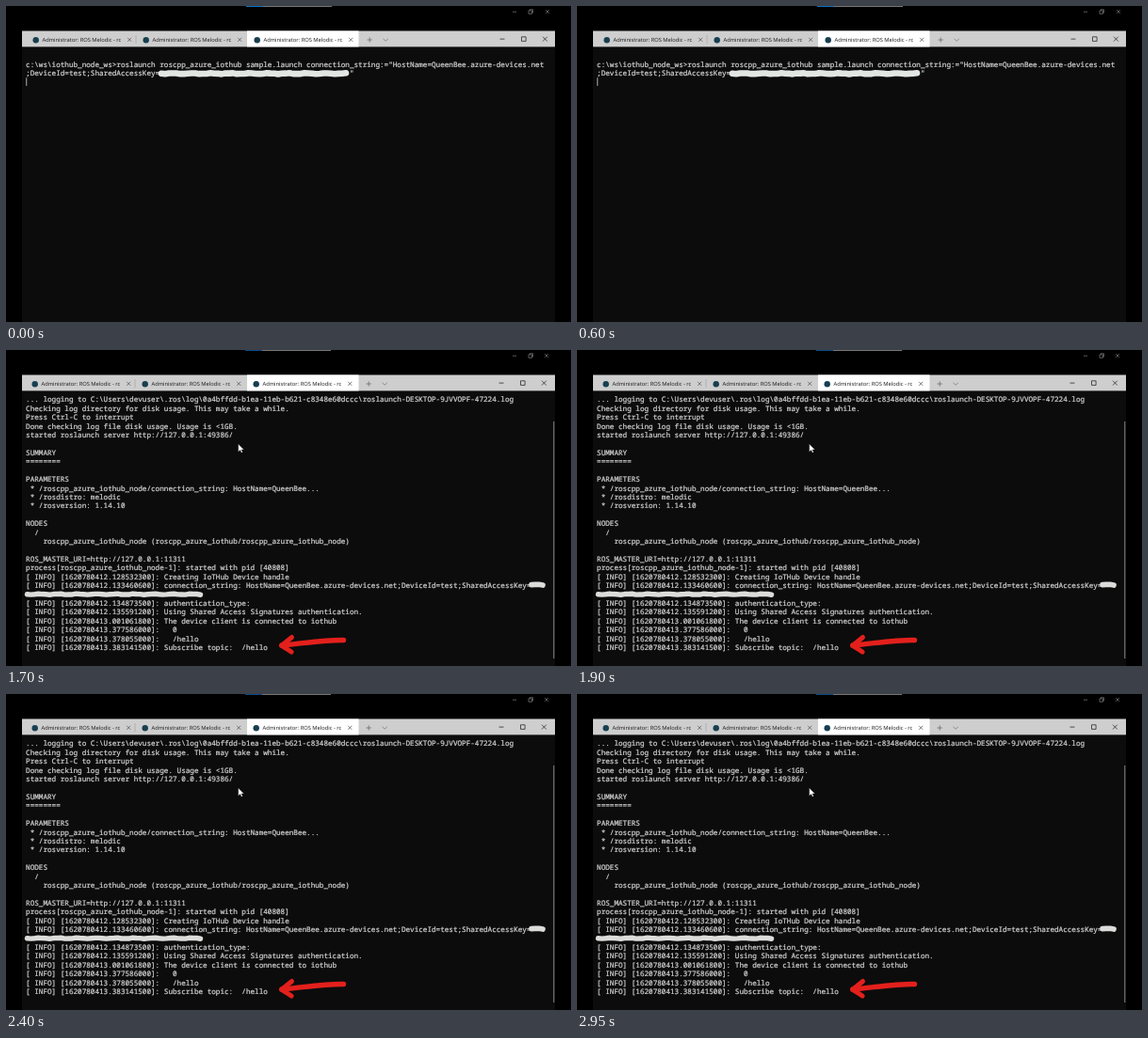
Animation of 600 by 336 pixels, one loop 3 s. Source, as an HTML page:

```html
<!DOCTYPE html>
<html lang="en">
<head>
<meta charset="utf-8">
<title>Terminal</title>
<style>
  html, body { margin: 0; width: 100%; height: 100%; overflow: hidden; background: #000; }
  svg { display: block; width: 100%; height: 100%; }
  text { white-space: pre; text-rendering: geometricPrecision; }
  .mono {
    font: 7.655px "Noto Sans Mono", "DejaVu Sans Mono", monospace;
    fill: #d0d0d0; stroke: #d0d0d0; stroke-width: .24;
  }
  .tab { font: 5.78px "Open Sans", "Noto Sans", sans-serif; fill: #161616; }
  .line { fill: none; stroke-width: .75; }
  .ink { fill: none; stroke-linecap: round; stroke-linejoin: round; }
</style>
</head>
<body>
<svg id="stage" viewBox="0 0 600 336" xmlns="http://www.w3.org/2000/svg">
  <rect width="600" height="336" fill="#000"/>
  <rect x="17" y="26.5" width="566" height="310" fill="#0c0c0c"/>
  <g id="command"></g>
  <g id="output"></g>
</svg>
<script>
const LOOP = 3000, CUT = 1700;
const LEFT = 21.1, TOP = 55.3, PITCH = 9.42;

const command = [
  '',
  'c:\\ws\\iothub_node_ws>roslaunch roscpp_azure_iothub sample.launch connection_string:="HostName=QueenBee.azure-devices.net',
  ';DeviceId=test;SharedAccessKey=' + ' '.repeat(44) + '"'
];

const info = (stamp, msg) => `[ INFO] [1620780${stamp}]: ${msg}`;
const output = [
  '... logging to C:\\Users\\devuser\\.ros\\log\\0a4bffdd-b1ea-11eb-b621-c8348e60dccc\\roslaunch-DESKTOP-9JVVOPF-47224.log',
  'Checking log directory for disk usage. This may take a while.',
  'Press Ctrl-C to interrupt',
  'Done checking log file disk usage. Usage is <1GB.',
  'started roslaunch server http://127.0.0.1:49386/',
  '',
  'SUMMARY',
  '========',
  '',
  'PARAMETERS',
  ' * /roscpp_azure_iothub_node/connection_string: HostName=QueenBee...',
  ' * /rosdistro: melodic',
  ' * /rosversion: 1.14.10',
  '',
  'NODES',
  '  /',
  '    roscpp_azure_iothub_node (roscpp_azure_iothub/roscpp_azure_iothub_node)',
  '',
  'ROS_MASTER_URI=http://127.0.0.1:11311',
  'process[roscpp_azure_iothub_node-1]: started with pid [40808]',
  info('412.128532300', 'Creating IoTHub Device handle'),
  info('412.133460600', 'connection_string: HostName=QueenBee.azure-devices.net;DeviceId=test;SharedAccessKey='),
  '',
  info('412.134873500', 'authentication_type:'),
  info('412.135591200', 'Using Shared Access Signatures authentication.'),
  info('413.001061800', 'The device client is connected to iothub'),
  info('413.377586000', '  0'),
  info('413.378055000', '  /hello'),
  info('413.383141500', 'Subscribe topic:  /hello')
];

const escapeText = s => s.replace(/&/g, '&amp;').replace(/</g, '&lt;');
const rect = (x, y, w, h, fill) => `<rect x="${x}" y="${y}" width="${w}" height="${h}" fill="${fill}"/>`;
const line = (d, color) => `<path class="line" d="${d}" stroke="${color}"/>`;
const ink = (d, width, color) => `<path class="ink" d="${d}" stroke="${color}" stroke-width="${width}"/>`;
const cross = (x, y, r, color) =>
  line(`M${x - r} ${y - r}l${2 * r} ${2 * r}M${x + r} ${y - r}l${-2 * r} ${2 * r}`, color);

const lines = rows => rows.map((s, i) => s &&
  `<text class="mono" x="${LEFT}" y="${TOP + i * PITCH}">${escapeText(s)}</text>`).join('');

// Slightly wavy marker stroke that hides the key
function scribble(x0, x1, y, width, color) {
  let d = `M${x0} ${y}`;
  for (let x = x0 + 4; x <= x1; x += 4)
    d += `L${x} ${(y + .4 * Math.sin(x * .31) + .2 * Math.sin(x * .83)).toFixed(2)}`;
  return ink(d, width, color);
}

const tab = x =>
  `<circle cx="${x + 10.7}" cy="36.3" r="3.2" fill="#173f50"/>` +
  `<text class="tab" x="${x + 17.5}" y="38.1">Administrator: ROS Melodic - rc</text>` +
  cross(x + 110.2, 35.8, 2, '#555');

function chrome(shift, accent) {
  const x = 256 + shift, r = 527 + shift, edge = 575 + shift;
  return rect(255 + shift, 0, 18, 1, accent) + rect(273 + shift, 0, 73, 1, '#777') +
    line('M538 6.2h4', '#777') +
    line('M555 4.9h3.4v3.4h-3.4zM556.1 4.9v-1.1h3.4v3.4h-1.1', '#777') +
    cross(edge, 6, 1.8, '#777') +
    rect(17, 26.5, 566, 16.9, '#cecece') +
    rect(256, 26.5, 118.5, 16.9, '#fff') +
    tab(x - 235) + tab(x - 118) + tab(x) +
    line(`M${x - 118} 31v9`, '#aaa') +
    line(`M${x + 127.5} 36h5.4m-2.7-2.7v5.4`, '#666') +
    line(`M${x + 144.5} 34.8l2.7 2.4 2.7-2.4`, '#777') +
    line(`M${r - 2.5} 35.1h5`, '#222') +
    line(`M${r + 20.5} 32.8h4.6v4.6h-4.6z`, '#222') +
    cross(r + 45.4, 35.1, 2.4, '#222');
}

const pointer = `<path d="M246.7 100v8.2l2-1.8 1.3 2.9 1.3-.6-1.3-2.8h2.6z"
  fill="#fff" stroke="#111" stroke-width=".3"/>`;

const arrow = ink('M358.5 308.5C341 308 319 311.5 293 314', 5.4, '#e3201c') +
  ink('M303.5 305.5C299 309 296 312 292.5 314.3C296 316.5 300 319 303 321', 5, '#e3201c');

const commandView = document.getElementById('command');
const outputView = document.getElementById('output');

commandView.innerHTML = chrome(0, '#0872c8') + lines(command) +
  scribble(165, 362, 71.8, 6.6, '#e2e6e2') + rect(21.4, 76.3, .8, 8.6, '#d8d8d8');

outputView.innerHTML = chrome(-1, '#0a4a86') + lines(output) +
  scribble(558, 570, 249.6, 5.6, '#dcdcda') + scribble(22.5, 206.5, 259.7, 5.4, '#dcdcda') +
  rect(581.3, 76, 1, 252, '#8a8a8a') + pointer + arrow;

function render(t) {
  const done = t >= CUT;
  commandView.style.display = done ? 'none' : '';
  outputView.style.display = done ? '' : 'none';
}

const start = performance.now();
function tick() {
  render((performance.now() - start) % LOOP);
  requestAnimationFrame(tick);
}
tick();
</script>
</body>
</html>
```
